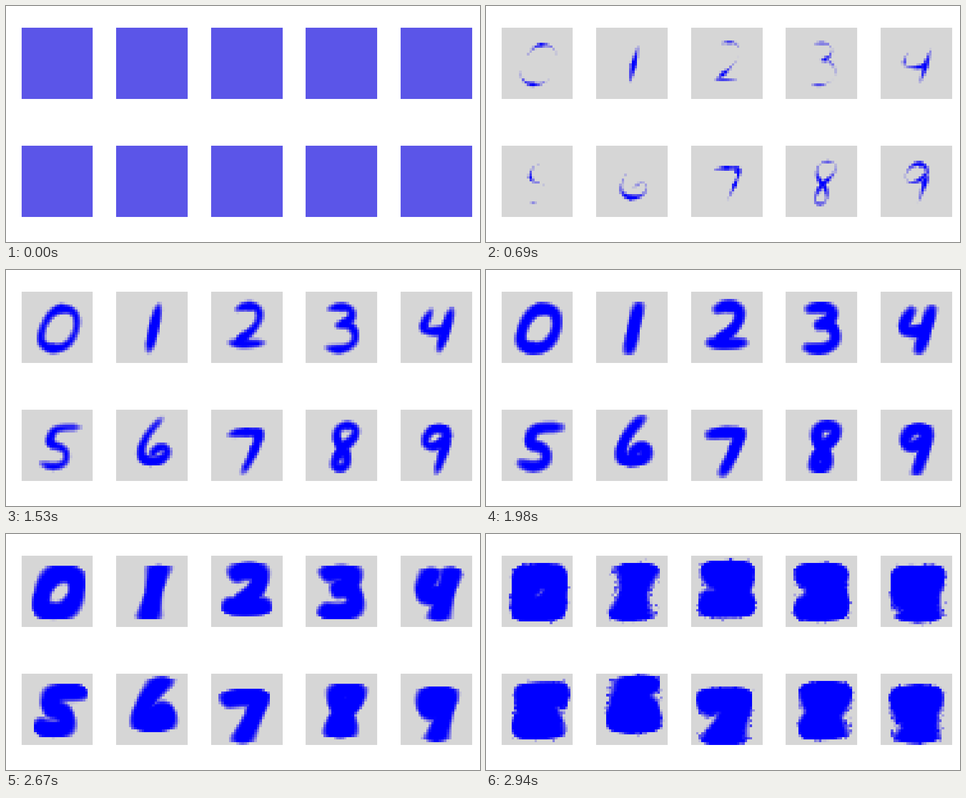
Animation of 848 by 424 pixels, one loop 2.97 s. Source, as an HTML page with a canvas:

```html
<!DOCTYPE html>
<html lang="en">
<head>
<meta charset="utf-8">
<title>Digit growth</title>
<style>
  html, body { margin: 0; width: 100%; height: 100%; overflow: hidden; background: #fff; }
  canvas { display: block; }
</style>
</head>
<body>
<canvas id="stage" width="848" height="424"></canvas>
<script>
const N = 28, STEP = 30, STEPS = 99, LATE = 1.5, HALF = 10.3;
const RAMP = [[214, 214, 214], [91, 85, 232], [0, 0, 255]];
const ctx = document.getElementById('stage').getContext('2d');
const cell = document.createElement('canvas');
cell.width = cell.height = N;
const cellCtx = cell.getContext('2d');
const pixels = cellCtx.createImageData(N, N);
const fields = [];

// How far the ink has spread: a logistic quantile curve
function reach(step) {
  const q = (step + 0.5) / STEPS;
  return 2.5 + 1.05 * Math.log(q / (1 - q));
}

function random(seed) {
  return () => {
    seed = (seed * 1664525 + 1013904223) >>> 0;
    return seed / 4294967296;
  };
}

// Ink starts at the hearts (x, y, delay); delays rise along the stroke and at open ends
function trace(stroke, hearts) {
  const path = document.createElementNS('http://www.w3.org/2000/svg', 'path');
  path.setAttribute('d', stroke);
  const length = path.getTotalLength(), closed = stroke.endsWith('Z');
  const samples = [];
  for (let s = 0; s <= length; s += 0.2) {
    const { x, y } = path.getPointAtLength(s);
    const delays = hearts.map(([hx, hy, delay]) =>
      LATE + (delay - LATE) * Math.exp(-Math.hypot(x - hx, y - hy) / 5));
    const end = closed ? 0 : Math.max(0, 1 - Math.min(s, length - s) / 2.5);
    samples.push([x, y, Math.min(...delays) + 0.8 * end]);
  }
  return samples;
}

function middle(values) {
  return (Math.min(...values) + Math.max(...values)) / 2;
}

// Distance at which ink arrives in each cell of a digit
function digit(hearts, ...strokes) {
  const samples = strokes.flatMap(s => trace(s, hearts)).concat(hearts);
  const cx = middle(samples.map(p => p[0])), cy = middle(samples.map(p => p[1]));
  const rnd = random(77 + fields.length * 9973), field = [];
  for (let y = 0.5; y < N; y++) {
    // slant varies, so strokes widen away from the middle row
    const lean = Math.max(0.65, 1.4 - 0.08 * Math.abs(y - cy));
    for (let x = 0.5; x < N; x++) {
      let best = Infinity;
      for (const [px, py, delay] of samples) {
        const dx = Math.abs(x - px);
        const d = Math.hypot(dx + (lean - 1) * Math.max(0, dx - 1.5), y - py);
        best = Math.min(best, d + delay * Math.exp(-d / (delay < 0 ? 0.9 : 2.5)));
      }
      const edge = (Math.abs(x - cx) ** 6 + Math.abs(y - cy) ** 6) ** (1 / 6);
      best += 2.7 * Math.max(0, edge - HALF);
      best -= Math.max(0, best - 5) * 0.6 * rnd() ** 5;
      field.push(best);
    }
  }
  fields.push(field);
}

digit([[15.5, 6.8, 0], [12, 22.2, -0.1]],
  'M16.3 6.8C24 6.8 22.5 16 18.7 20C15 24 7.5 22.8 7.7 18C7.9 13.5 11.5 6.8 16.3 6.8Z');
digit([[14.6, 14.5, -1.4]],
  'M16.7 5.6L12.8 23.2');
digit([[12.5, 18.2, -0.1], [15, 5.9, 0.3]],
  'M10.4 7C15 4.5 19.5 5.5 19 10C18.5 14 13 18 9.5 20.6', 'M7.8 20Q14 21 20.5 20');
digit([[15.5, 12.6, -0.1], [14, 6.2, 0.4], [13, 22.7, 0.4]],
  'M9.4 6.9C15 5 18.5 6.5 18 9.5Q17.5 12.3 12.8 13.2',
  'M15.8 12.6C20 14.5 20.5 19 17.5 21.2Q14 23.6 8.6 22');
digit([[17, 15, -1], [9.4, 13.4, 0.5]],
  'M12 7.6C9.5 12 7.5 15 11 15.5Q14 15.9 17 15.2', 'M20 7Q17.8 15 15 23.2');
digit([[11.5, 12.5, 0.3], [12.6, 22.4, 0.9]],
  'M23 7C17 7 13 6.8 11.8 10C11 12.5 11 13 12.5 14C16 14.8 18 16 17.6 19C16.8 23 11 23 7.8 21');
digit([[13.5, 20.5, -1.2]],
  'M18 3.5C13 8 9.5 14 9.8 17C10.2 21 16 21.3 19 18.6C21.5 15.5 18 12.5 14.5 17');
digit([[14, 8.9, -0.1], [18, 10, -0.1], [17, 15.5, 0.1]],
  'M7.4 9.9Q12 8.5 18.5 9C19.8 10.5 16.5 17.5 12.4 25');
digit([[14.5, 15.3, -1.2], [16.3, 6.4, 0.5], [13.2, 23, 0.2]],
  'M14.5 15.2C18 12 20 10.5 19.5 8C18.5 5.5 14 5.8 12.6 8.2C11.5 11 12.5 13 14.5 15.2'
  + 'C16.5 18 17 22 14 23C10.5 23.3 10.5 20 14.5 15.2Z');
digit([[17.2, 14.5, -1], [15.5, 7.5, -0.8]],
  'M18.4 10.5C17.5 5.5 12 6.5 10 11C8.5 15 14 16.5 18.4 10.5Z', 'M18.4 10.5Q17.5 15 14 25');

function paintCells(field, radius) {
  const soft = 1.3 + 0.2 * Math.max(0, radius - 3);
  const ink = field.map(d => Math.max(0, Math.min(1, (radius - d) / soft)));
  const top = Math.max(...ink);
  ink.forEach((v, i) => {
    // a cell field without ink sits at the middle of the ramp
    const s = top > 0 ? v / top * 2 : 1;
    const k = s < 1 ? 0 : 1;
    for (let c = 0; c < 3; c++) {
      pixels.data[i * 4 + c] = RAMP[k][c] + (RAMP[k + 1][c] - RAMP[k][c]) * (s - k);
    }
    pixels.data[i * 4 + 3] = 255;
  });
  cellCtx.putImageData(pixels, 0, 0);
}

function draw(step) {
  ctx.fillStyle = '#fff';
  ctx.fillRect(0, 0, 848, 424);
  ctx.imageSmoothingEnabled = false;
  const radius = reach(step);
  fields.forEach((field, i) => {
    paintCells(field, radius);
    ctx.drawImage(cell, 27.5 + 169.6 * (i % 5), 38.8 + 212 * Math.floor(i / 5), 127.8, 127.8);
  });
}

const start = performance.now();
let shown = -1;
function tick() {
  const step = Math.floor((performance.now() - start) / STEP) % STEPS;
  if (step !== shown) draw(shown = step);
  requestAnimationFrame(tick);
}
tick();
</script>
</body>
</html>
```
